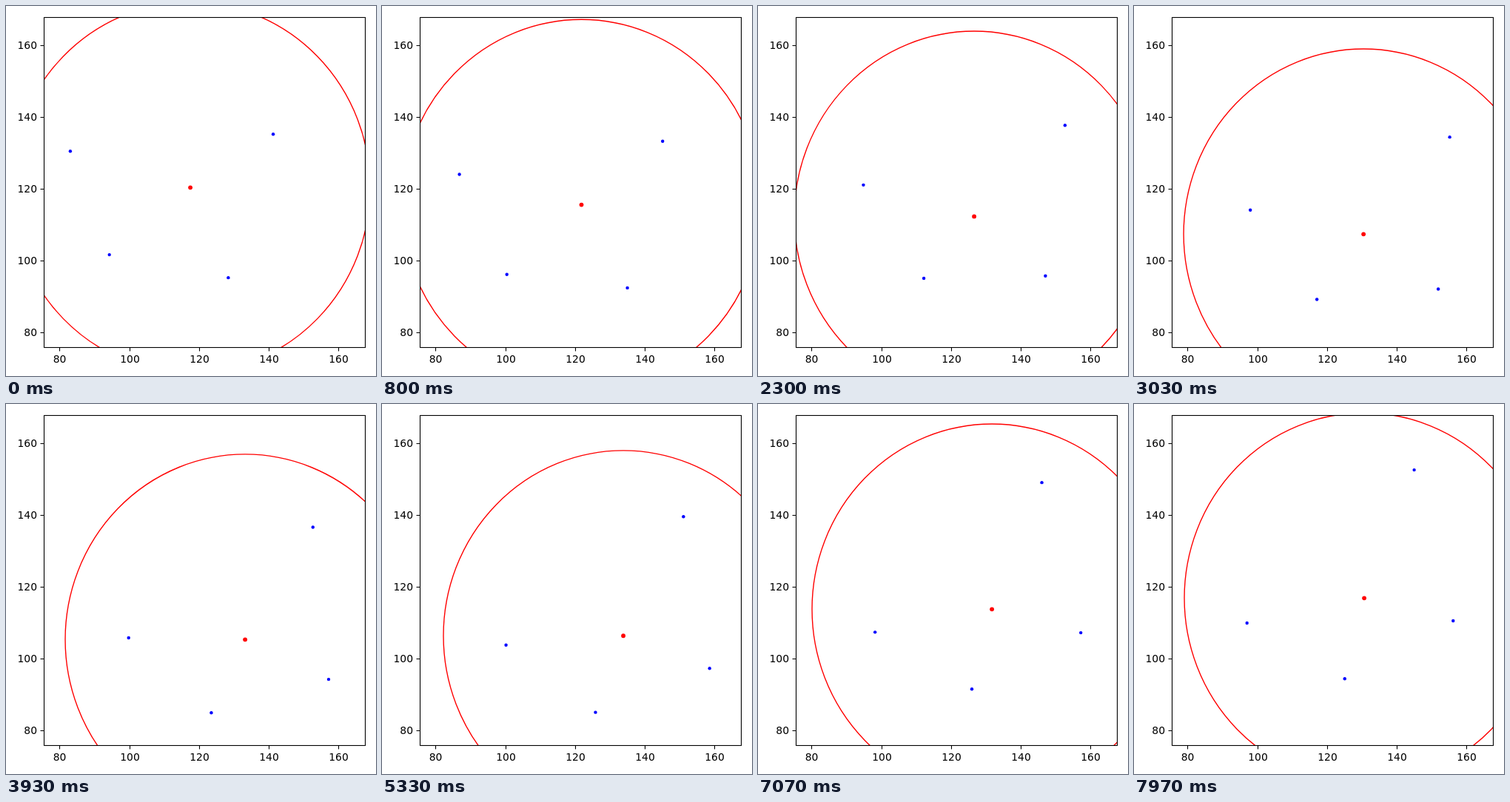
An HTML page with a canvas that plays this animation: 500 by 500 pixels, repeating every 8 s.

```html
<!DOCTYPE html>
<html lang="en">
<head>
<meta charset="utf-8">
<title>Swarm centre</title>
<style>
  html, body { margin: 0; width: 100%; height: 100%; overflow: hidden; background: #fff; }
  canvas { display: block; }
</style>
</head>
<body>
<canvas id="plot" width="500" height="500"></canvas>
<script>
const ctx = document.getElementById('plot').getContext('2d');
const LOOP = 8000, STEPS = 240;
const BOX = { left: 51, top: 15, right: 485, bottom: 461 };
const RX = 243.1, RY = 250.4;

// Key poses of the whole group: time, x, y, turn in degrees
const poses = [
  [0, 221.5, 268.5, 0],
  [1570, 269, 302, -8.5],
  [2050, 285, 280, -10.5],
  [3030, 310, 308, -15],
  [3930, 323, 318, -25.8],
  [5330, 326, 313, -30.6],
  [7070, 316, 277, -36.5],
  [7970, 311, 262, -37]
];

// Each agent's place in the group, drifting slightly over the loop
const agents = [
  { angle: 208.3, drift: -3.3, radius: 153, growth: 9 },
  { angle: -34.4, drift: 2.7, radius: 169, growth: 17 },
  { angle: 140.6, drift: 0, radius: 106, growth: 6 },
  { angle: 51.3, drift: 0, radius: 126, growth: -2 }
];

// The marked centre starts away from the group's mean and joins it
const LAG = { x: 27.5, y: -23.5, time: 1570 };

// Smooth cubic through rows of [time, ...values]
function sample(rows, t) {
  const last = rows.length - 1;
  let i = 0;
  while (i < last - 1 && t >= rows[i + 1][0]) i++;
  const a = rows[i], b = rows[i + 1];
  const h = b[0] - a[0];
  const u = Math.min(1, (t - a[0]) / h), w = 1 - u;
  const slope = (k, c) => {
    const p = rows[Math.max(0, k - 1)], q = rows[Math.min(last, k + 1)];
    return (q[c] - p[c]) / (q[0] - p[0]);
  };
  return a.slice(1).map((v, j) => {
    const c = j + 1;
    return v * (1 + 2 * u) * w * w + b[c] * u * u * (3 - 2 * u)
      + h * u * w * (slope(i, c) * w - slope(i + 1, c) * u);
  });
}

function dot(x, y, r, color) {
  ctx.fillStyle = color;
  ctx.beginPath();
  ctx.arc(x, y, r, 0, 2 * Math.PI);
  ctx.fill();
}

function line(x1, y1, x2, y2) {
  ctx.beginPath();
  ctx.moveTo(x1, y1);
  ctx.lineTo(x2, y2);
  ctx.stroke();
}

function drawAxes() {
  const { left, top, right, bottom } = BOX;
  ctx.strokeStyle = ctx.fillStyle = '#000';
  ctx.lineWidth = 1.1;
  ctx.strokeRect(left, top, right - left, bottom - top);
  ctx.font = '13.89px "DejaVu Sans", sans-serif';
  for (let i = 0; i < 5; i++) {
    const label = String(80 + 20 * i);
    const x = Math.round(72.4 + 94.1 * i), y = Math.round(440.8 - 96.9 * i);
    line(x, bottom, x, bottom + 5);
    line(left, y, left - 5, y);
    ctx.textAlign = 'center';
    ctx.fillText(label, x, 481.5);
    ctx.textAlign = 'right';
    ctx.fillText(label, 41.5, y + 4.5);
  }
}

function drawGroup(t) {
  const [x, y, turn] = sample(poses, t);
  const lag = 1 - Math.min(1, t / LAG.time) ** 3;
  const cx = x + LAG.x * lag, cy = y + LAG.y * lag;
  ctx.strokeStyle = '#f00';
  ctx.lineWidth = 1.39;
  ctx.beginPath();
  ctx.ellipse(cx, cy, RX, RY, 0, 0, 2 * Math.PI);
  ctx.stroke();
  for (const { angle, drift, radius, growth } of agents) {
    const u = t / LOOP;
    const a = (angle + turn + drift * u) * Math.PI / 180;
    const r = radius + growth * u;
    dot(x + r * Math.cos(a), y + r * Math.sin(a), 2.2, '#00f');
  }
  dot(cx, cy, 2.9, '#f00');
}

function draw(t) {
  ctx.setTransform(1, 0, 0, 1, 0, 0);
  ctx.fillStyle = '#fff';
  ctx.fillRect(0, 0, 500, 500);
  ctx.translate(0.5, 0.5);

  ctx.save();
  ctx.beginPath();
  ctx.rect(BOX.left, BOX.top, BOX.right - BOX.left, BOX.bottom - BOX.top);
  ctx.clip();
  ctx.translate(-0.4, -0.2);
  drawGroup(t);
  ctx.restore();

  drawAxes();
}

const start = performance.now();
function tick() {
  const t = (performance.now() - start) % LOOP;
  const step = Math.floor((t + 4) * STEPS / LOOP) % STEPS;
  draw(step * LOOP / STEPS);
  requestAnimationFrame(tick);
}
tick();
</script>
</body>
</html>
```
